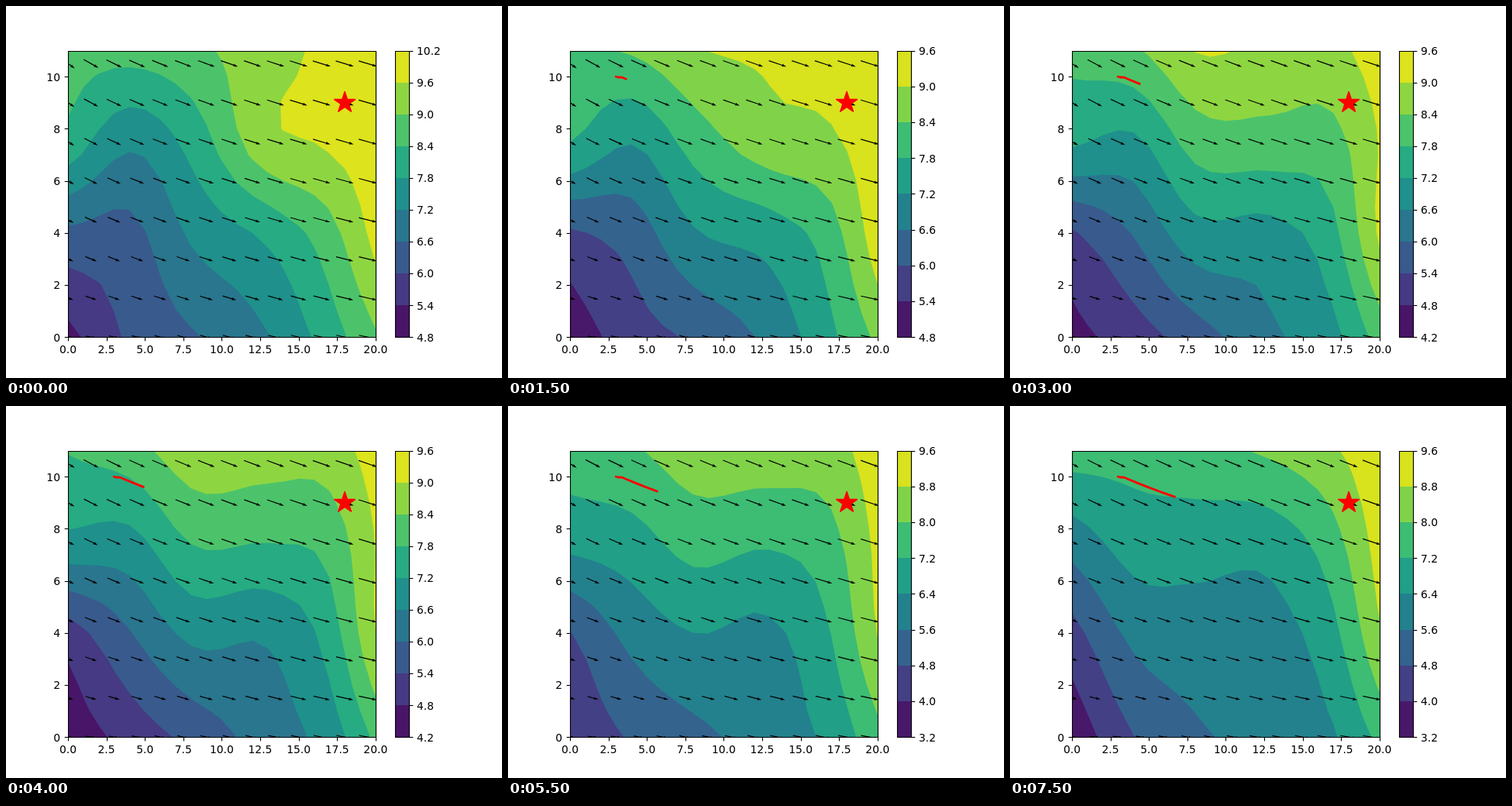
These frames come from a looping animation (640 by 480 pixels, 8 s). An HTML page:

```html
<!DOCTYPE html>
<html lang="en">
<head>
<meta charset="utf-8">
<title>Contour field with path</title>
<style>
  html, body { margin: 0; width: 100%; height: 100%; overflow: hidden; background: #fff; }
  svg { display: block; width: 640px; height: 480px; }
  text { font: 13.89px "DejaVu Sans", sans-serif; fill: #000; }
  .line { fill: none; stroke: #000; stroke-width: 1.11; }
</style>
</head>
<body>
<svg viewBox="0 0 640 480">
  <clipPath id="plot"><rect x="80" y="58" width="397" height="369.5"/></clipPath>
  <g clip-path="url(#plot)">
    <g id="bands"></g>
    <path id="arrows"/>
    <path id="trail" fill="none" stroke="#f00" stroke-width="2.78" stroke-linecap="square" stroke-linejoin="round"/>
    <path id="star" fill="#f00" stroke="#f00" stroke-width="1.39" stroke-linejoin="bevel"/>
  </g>
  <g id="axes"></g>
  <g id="bar"></g>
</svg>
<script>
const STEP = 500, STEPS = 16;
const LEFT = 80, RIGHT = 476.8, TOP = 57.6, BOTTOM = 427.2;
const px = x => LEFT + 19.84 * x;
const py = y => BOTTOM - 33.6 * y;
const snap = v => Math.floor(v + 0.5) + 0.5;
const mix = (a, b, t) => a + (b - a) * t;
const $ = id => document.getElementById(id);
const pathOf = pts => 'M' + pts.map(p => p[0].toFixed(2) + ' ' + p[1].toFixed(2)).join('L');

// Colour scale from step `at` on.
const scales = [
  { at: 0, min: 4.8, max: 10.2, gap: 0.6 },
  { at: 3, min: 4.8, max: 9.6, gap: 0.6 },
  { at: 4, min: 4.2, max: 9.6, gap: 0.6 },
  { at: 9, min: 4.0, max: 9.6, gap: 0.8 },
  { at: 11, min: 3.2, max: 9.6, gap: 0.8 }
];

// Field heights at a few key points; one row per knot in y, bottom row first.
const knotsX = [0, 4, 8, 13, 17, 20], knotsY = [0, 4, 7.5, 11];
const keys = [
  { at: 0, rows: [
    [5.2, 6.1, 6.53, 7.17, 8.1, 8.92],
    [6.47, 6.42, 7.3, 7.95, 8.77, 9.8],
    [8.2, 7.32, 8, 9.43, 9.68, 9.95],
    [8.65, 8.65, 8.85, 9.38, 9.75, 10.1]] },
  { at: 4, rows: [
    [4.95, 5.58, 5.94, 6.63, 7.55, 8.4],
    [5.73, 6.22, 7.08, 7.33, 7.95, 9.2],
    [7.72, 7.2, 8.05, 8.52, 8.65, 9.2],
    [8.2, 8.4, 8.98, 9, 9.12, 9.4]] },
  { at: 6, rows: [
    [4.6, 5.1, 5.7, 6.5, 7.03, 8.05],
    [5.33, 6.04, 6.98, 7, 7.65, 9.1],
    [7.32, 7.08, 8.05, 8.17, 8.2, 9.03],
    [7.95, 8.3, 9.02, 8.85, 8.85, 9.3]] },
  { at: 11, rows: [
    [4.15, 4.88, 5.37, 6, 6.63, 7.75],
    [4.77, 5.85, 6.4, 6.25, 7.22, 8.83],
    [6.62, 6.87, 7.5, 7.3, 7.75, 9],
    [7.65, 7.9, 8.45, 8.5, 8.5, 9.25]] },
  { at: 15, rows: [
    [3.4, 4.78, 5.47, 5.85, 6.32, 7.4],
    [4.52, 5.8, 6.05, 6.1, 7, 8.7],
    [5.93, 6.75, 6.75, 6.75, 7.7, 9.15],
    [7.6, 7.5, 7.75, 8.15, 8.7, 9.45]] }
];

// Smooth cubic through unevenly spaced knots.
function smooth(knots, values, s) {
  const last = knots.length - 1;
  const slope = i => (values[i + 1] - values[i]) / (knots[i + 1] - knots[i]);
  const tangent = i => {
    if (i === 0) return slope(0);
    if (i === last) return slope(last - 1);
    const share = (knots[i] - knots[i - 1]) / (knots[i + 1] - knots[i - 1]);
    return mix(slope(i - 1), slope(i), share);
  };
  let i = 0;
  while (i < last - 1 && s > knots[i + 1]) i++;
  const h = knots[i + 1] - knots[i], t = (s - knots[i]) / h, r = 1 - t;
  return r * r * ((1 + 2 * t) * values[i] + t * h * tangent(i)) +
    t * t * ((3 - 2 * t) * values[i + 1] - r * h * tangent(i + 1));
}

// Heights on the unit grid, as field[y][x].
function fieldAt(step) {
  const n = Math.max(1, keys.findIndex(k => k.at >= step));
  const a = keys[n - 1], b = keys[n], t = (step - a.at) / (b.at - a.at);
  const rows = a.rows.map((row, j) => row.map((v, i) => mix(v, b.rows[j][i], t)));
  return Array.from({ length: 12 }, (_, y) => Array.from({ length: 21 }, (_, x) =>
    smooth(knotsY, rows.map(row => smooth(knotsX, row, x)), y)));
}

// All grid cells, each cut to its part above the level.
function areaAbove(field, level) {
  let d = '';
  for (let y = 0; y < 11; y++) {
    for (let x = 0; x < 20; x++) {
      const cell = [[x, y], [x + 1, y], [x + 1, y + 1], [x, y + 1]];
      const part = [];
      cell.forEach((p, i) => {
        const q = cell[(i + 1) % 4];
        const hp = field[p[1]][p[0]] - level, hq = field[q[1]][q[0]] - level;
        if (hp >= 0) part.push(p);
        if (hp >= 0 !== hq >= 0) {
          const t = hp / (hp - hq);
          part.push([mix(p[0], q[0], t), mix(p[1], q[1], t)]);
        }
      });
      if (part.length) d += pathOf(part.map(p => [px(p[0]), py(p[1])])) + 'Z';
    }
  }
  return d;
}

// Polynomial fit of the viridis colour map.
const viridis = [
  [0.2777, 0.1051, -0.3309, -4.6342, 6.2283, 4.7764, -5.4355],
  [0.0054, 1.4046, 0.2148, -5.7991, 14.1799, -13.7451, 4.6459],
  [0.3341, 1.3846, 0.0951, -19.3324, 56.6906, -65.3530, 26.3124]
];
const colour = t => 'rgb(' + viridis.map(c =>
  Math.round(255 * c.reduceRight((sum, k) => sum * t + k, 0))).join() + ')';

function arrow(x, y, u, v) {
  const len = Math.hypot(u, v), c = u / len, s = v / len, w = 1.2, h = len / 2;
  const half = [[-h, w / 2], [h - 4.5 * w, w / 2], [h - 5 * w, 1.5 * w], [h, 0]];
  const back = half.slice(0, 3).reverse().map(([a, b]) => [a, -b]);
  return pathOf([...half, ...back].map(([a, b]) => [x + a * c - b * s, y + a * s + b * c])) + 'Z';
}

// The flow is longer to the right and steeper at the upper left.
function arrows(step) {
  const t = step / (STEPS - 1);
  let d = '';
  for (let x = 0; x < 20; x += 1.5) {
    for (let y = 0; y < 11; y += 1.5) {
      const sx = x / 19.5, sy = y / 10.5;
      const u = mix(13 + 10 * sx ** 1.5, 17.5 + 6 * Math.sqrt(sx), sy);
      const v = mix(5 - t, 7 + 2 * t, sy) + Math.exp(-x / 5) * ((8 - 4 * t) * sy ** 0.6 - 3);
      d += arrow(px(x), py(y), u, v);
    }
  }
  return d;
}

function trail(step) {
  const pts = [[px(3), py(10)]];
  for (let i = 1; i <= step; i++) {
    const x = px(3) + 5.02 * (i - 0.5), run = Math.max(0, x - 147);
    pts.push([x, 92 + 0.43 * run - 0.0007 * run * run]);
  }
  return step ? pathOf(pts) : '';
}

function star(x, y, radius) {
  const tips = Array.from({ length: 10 }, (_, i) => {
    const r = i % 2 ? radius * 0.382 : radius, a = i * Math.PI / 5;
    return [x + r * Math.sin(a), y - r * Math.cos(a)];
  });
  return pathOf(tips) + 'Z';
}

const label = (x, y, anchor, s) => `<text x="${x}" y="${y}" text-anchor="${anchor}">${s}</text>`;
const baseline = y => Math.round(y + 5.4);
const stroke = d => `<path class="line" d="${d}"/>`;
const box = (x0, x1) => stroke(`M${snap(x0)} ${snap(TOP)}H${snap(x1)}V${snap(BOTTOM)}H${snap(x0)}Z`);

function drawAxes() {
  let out = box(LEFT, RIGHT);
  for (let x = 0; x <= 20; x += 2.5)
    out += stroke(`M${snap(px(x))} 427.5v4.86`) + label(px(x), 448, 'middle', x.toFixed(1));
  for (let y = 0; y <= 10; y += 2)
    out += stroke(`M80.5 ${snap(py(y))}h-4.86`) + label(70, baseline(py(y)), 'end', y);
  $('axes').innerHTML = out;
  $('star').setAttribute('d', star(px(18), py(9), 14.5));
}

function draw(step) {
  const { min, max, gap } = scales.filter(s => s.at <= step).pop();
  const count = Math.round((max - min) / gap), field = fieldAt(step);
  let bands = '', fills = '', ticks = '';
  for (let i = 0; i <= count; i++) {
    const level = min + i * gap, y = mix(BOTTOM, TOP, i / count);
    ticks += stroke(`M520.5 ${snap(y)}h4.86`) + label(530, baseline(y), 'start', level.toFixed(1));
    if (i === count) break;
    const fill = colour((i + 0.5) / count);
    const area = i ? areaAbove(field, level) : 'M0 0H640V480H0Z';
    bands += `<path fill="${fill}" d="${area}"/>`;
    fills += `<rect x="502" y="58" width="18.5" height="${Math.round(y) - 58}" fill="${fill}"/>`;
  }
  $('bands').innerHTML = bands;
  $('bar').innerHTML = fills + box(501.6, 520.08) + ticks;
  $('arrows').setAttribute('d', arrows(step));
  $('trail').setAttribute('d', trail(step));
}

let shown = -1;
const start = performance.now();
function tick() {
  const step = Math.floor((performance.now() - start) / STEP) % STEPS;
  if (step !== shown) draw(shown = step);
  requestAnimationFrame(tick);
}
drawAxes();
tick();
</script>
</body>
</html>
```
